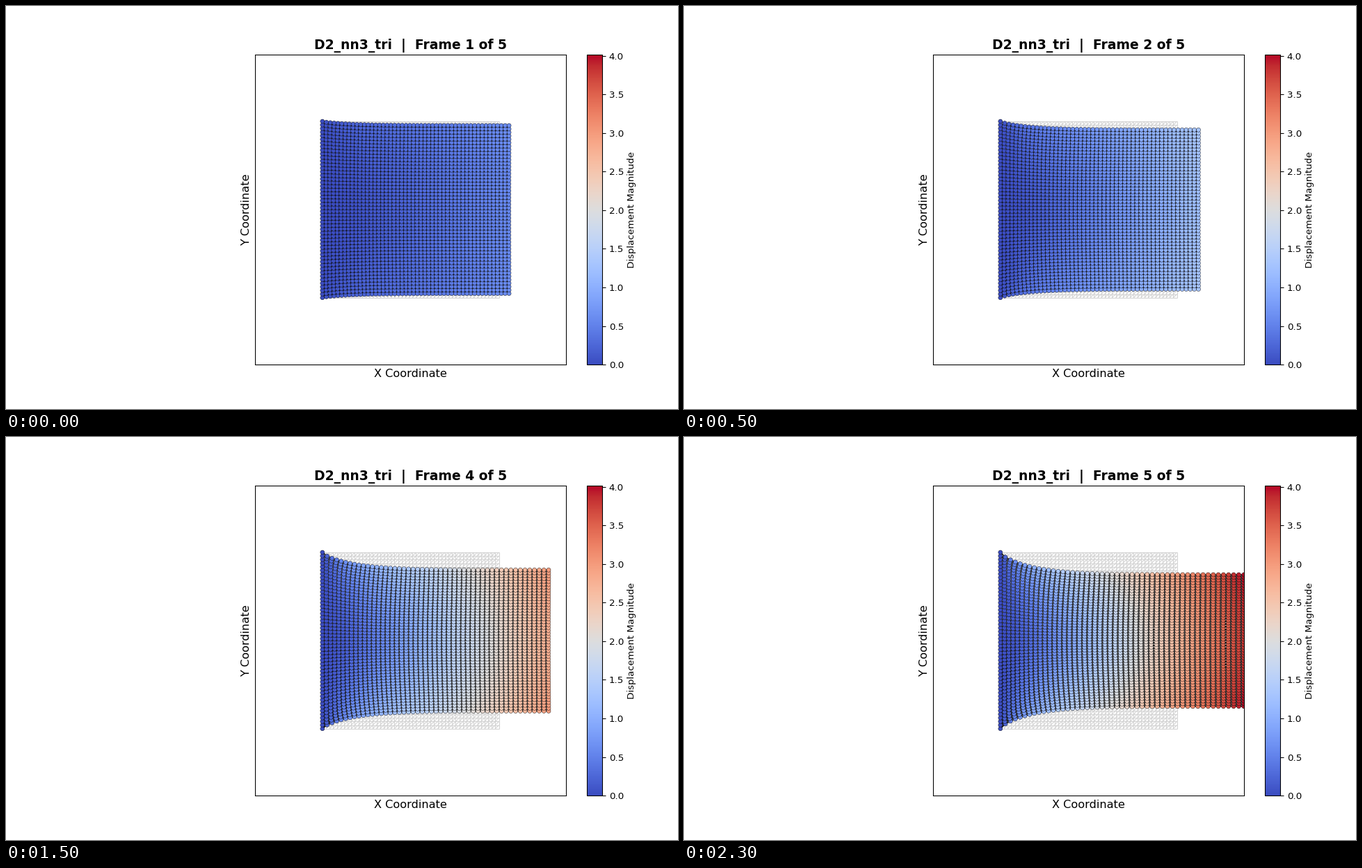
Animation, 966 px wide and 580 px high, one loop 2500 ms. Source, as a matplotlib script:

```python
import numpy as np
import matplotlib.pyplot as plt
from matplotlib.animation import FuncAnimation
from matplotlib.collections import LineCollection

W, H, DPI = 966, 580, 100
K = H / 600                    # point sizes are scaled to the stage
STEPS = 5

# Stretched sheet: neo-Hookean, left side clamped, equal load steps on the right
N = 50
SIDE = 10.0
MU, LAM = 1.0, 7.3
LOAD = 0.205
SUBSTEPS, ITERATIONS = 3, 4

h = SIDE / (N - 1)
m = 2 * N                      # unknowns per node column
eye = np.eye(2)


def shape_gradients():
    pts = 0.5 + np.array([-0.5, 0.5]) / np.sqrt(3)
    grads = []
    for x in pts:
        for y in pts:
            nx, ny = (1 - x, x), (1 - y, y)
            grads.append([((2 * a - 1) * ny[b] / h, (2 * b - 1) * nx[a] / h)
                          for a in (0, 1) for b in (0, 1)])
    return np.array(grads)


G = shape_gradients()
AREA = h * h / 4
K0 = MU * np.einsum('qaj,qbj,ik->aibk', G, G, eye)
DOFS = np.array([[a * m + 2 * (r + b) + i
                  for a in (0, 1) for b in (0, 1) for i in (0, 1)]
                 for r in range(N - 1)])


def assemble(u):
    """Stiffness and inner force for each strip between two node columns."""
    ue = np.stack([u[:-1, :-1], u[:-1, 1:], u[1:, :-1], u[1:, 1:]], axis=2)
    F = eye + np.einsum('crai,qaj->crqij', ue, G)
    ln_j = np.log(np.linalg.det(F))[..., None, None]
    inv = np.linalg.inv(F)
    P = MU * F + (LAM * ln_j - MU) * np.swapaxes(inv, -1, -2)
    g = np.einsum('qaj,crqjk->crqak', G, inv)

    ke = (K0 + np.einsum('crqak,crqbi->craibk', (MU - LAM * ln_j) * g, g)
          + LAM * np.einsum('crqai,crqbk->craibk', g, g)) * AREA
    fe = np.einsum('crqij,qaj->crai', P, G) * AREA
    ke = ke.reshape(N - 1, N - 1, 8, 8)
    fe = fe.reshape(N - 1, N - 1, 8)

    stiff = np.zeros((N - 1, 2 * m, 2 * m))
    force = np.zeros((N - 1, 2 * m))
    for r, d in enumerate(DOFS):
        stiff[:, d[:, None], d[None, :]] += ke[:, r]
        force[:, d] += fe[:, r]
    return stiff, force


def newton_step(u, load):
    """Block elimination from the clamped side to the loaded one."""
    stiff, force = assemble(u)
    diag = stiff[:, m:, m:].copy()
    diag[:-1] += stiff[1:, :m, :m]
    upper = stiff[1:, :m, m:]
    res = -force[:, m:]
    res[:-1] -= force[1:, :m]
    res[-1] += load

    coef, part = [], []
    s, b = diag[0], res[0]
    for c in range(N - 2):
        sol = np.linalg.solve(s, np.column_stack([upper[c], b]))
        coef.append(sol[:, :-1])
        part.append(sol[:, -1])
        s = diag[c + 1] - upper[c].T @ coef[c]
        b = res[c + 1] - upper[c].T @ part[c]

    du = np.zeros((N, m))
    du[-1] = np.linalg.solve(s, b)
    for c in range(N - 3, -1, -1):
        du[c + 1] = part[c] - coef[c] @ du[c + 2]
    return u + du.reshape(N, N, 2)


def solve_all():
    edge = np.zeros((N, 2))
    edge[:, 0] = h
    edge[[0, -1], 0] = h / 2
    u = np.zeros((N, N, 2))
    states = []
    for k in range(1, STEPS * SUBSTEPS + 1):
        load = (LOAD * k / SUBSTEPS * edge).ravel()
        for _ in range(ITERATIONS):
            u = newton_step(u, load)
        if k % SUBSTEPS == 0:
            states.append(u.reshape(-1, 2))
    return states


def mesh_edges():
    """Node pairs of the triangle mesh: columns, rows and diagonals."""
    ids = np.arange(N * N).reshape(N, N)
    pairs = [(ids[:, :-1], ids[:, 1:]),
             (ids[:-1], ids[1:]),
             (ids[:-1, :-1], ids[1:, 1:])]
    return np.concatenate([np.stack([a.ravel(), b.ravel()], axis=1)
                           for a, b in pairs])


axis = np.linspace(0, SIDE, N)
rest = np.stack(np.meshgrid(axis, axis, indexing='ij'), axis=-1).reshape(-1, 2)
edges = mesh_edges()
states = solve_all()

plt.rcParams.update({
    'font.family': 'DejaVu Sans',
    'font.size': 10 * K,
    'axes.linewidth': 0.8 * K,
    'axes.titlepad': 6 * K,
    'axes.labelpad': 4 * K,
    'ytick.major.size': 3.5 * K,
    'ytick.major.width': 0.8 * K,
    'ytick.major.pad': 3.5 * K,
})

MARGIN = 3.8
fig, ax = plt.subplots(figsize=(W / DPI, H / DPI), dpi=DPI, facecolor='white')
ax.set(xlim=(-MARGIN, SIDE + MARGIN), ylim=(-MARGIN, SIDE + MARGIN),
       xticks=[], yticks=[], aspect='equal')
ax.set_xlabel('X Coordinate', fontsize=12 * K)
ax.set_ylabel('Y Coordinate', fontsize=12 * K)
title = ax.set_title('', fontsize=14 * K, fontweight='bold')


def add_mesh(color, width, zorder):
    return ax.add_collection(
        LineCollection(rest[edges], colors=color, linewidths=width * K,
                       zorder=zorder), autolim=False)


add_mesh('lightgray', 0.8, 1)
mesh = add_mesh('black', 1.0, 1.5)
dots = ax.scatter(*rest.T, c=np.zeros(N * N), s=20 * K**2, cmap='coolwarm',
                  vmin=0, vmax=4.018, edgecolors='black',
                  linewidths=0.3 * K, zorder=2)

bar = fig.colorbar(dots, ax=ax, fraction=0.046, pad=0.04,
                   ticks=np.arange(0, 4.1, 0.5))
bar.set_label('Displacement Magnitude', fontsize=10 * K)


def update(i):
    u = states[i]
    pos = rest + u
    mesh.set_segments(pos[edges])
    dots.set_offsets(pos)
    dots.set_array(np.hypot(*u.T))
    title.set_text(f'D2_nn3_tri  |  Frame {i + 1} of {STEPS}')
    return mesh, dots, title


anim = FuncAnimation(fig, update, frames=STEPS, interval=500,
                     repeat=True, repeat_delay=0, blit=False)
plt.show()
```
